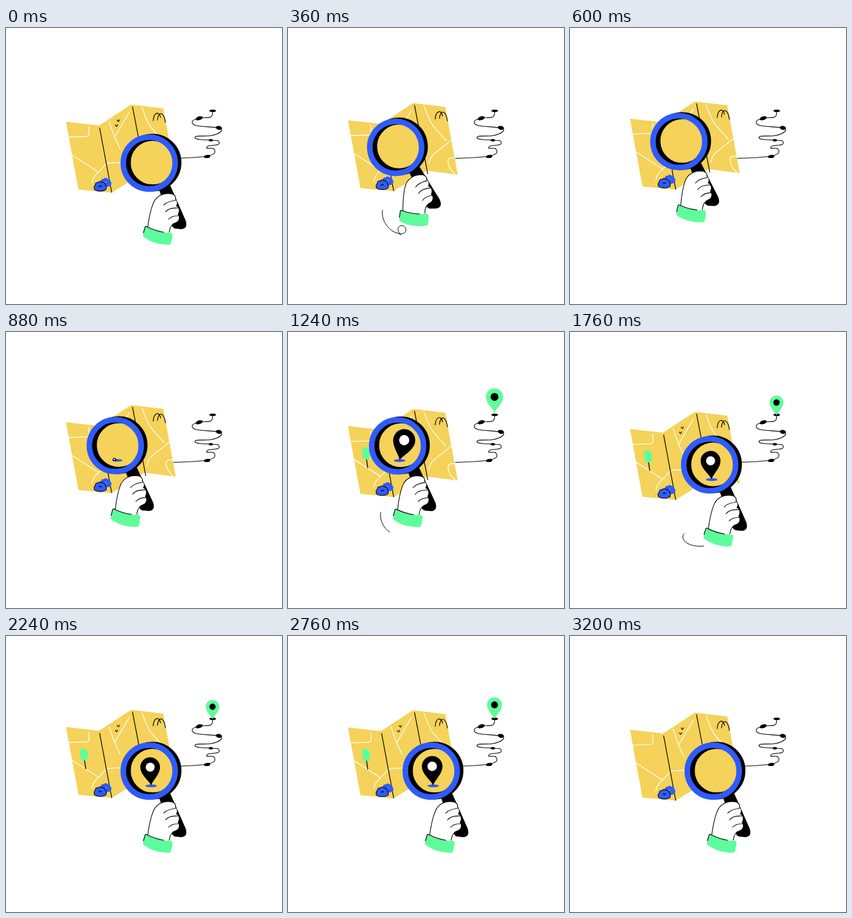
These frames come from a looping animation (450x450 px, 3240 ms). An HTML page with a canvas:

```html
<!DOCTYPE html>
<html lang="en">
<head>
<meta charset="utf-8">
<title>Map search</title>
<style>
html, body { margin: 0; width: 100%; height: 100%; overflow: hidden; background: #fff; }
canvas { display: block; width: 450px; height: 450px; }
</style>
</head>
<body>
<canvas id="stage" width="450" height="450"></canvas>
<script>
const ctx = document.getElementById('stage').getContext('2d');
const LOOP = 3240, STEP = 40, TAU = Math.PI * 2;
const YELLOW = '#f5d259', BLUE = '#2f5bfa', GREEN = '#5ffc9b', BLACK = '#000', WHITE = '#fff';
const LENS = { x: 233.5, y: 220.3 };

// Motion rules
function ease(t, from, to) {
  const u = Math.min(1, Math.max(0, (t - from) / (to - from)));
  return u * u * (3 - 2 * u);
}
const show = (t, in0, in1, out0, out1) => ease(t, in0, in1) - ease(t, out0, out1);
const bump = (t, from, to) => t > from && t < to ? Math.sin(Math.PI * (t - from) / (to - from)) ** 2 : 0;
const wobble = (t, peak, period, decay) => Math.exp((peak - t) / decay) * Math.cos(TAU * (t - peak) / period);

// The first and last quarter swing half as far as the middle
function bob(t) {
  const c = Math.cos(TAU * 2 * t / LOOP);
  return t > LOOP / 4 && t < LOOP * 3 / 4 ? 6 * c : 3 * c - 3;
}

function lensPose(t) {
  const back = 1 - ease(t, 1200, 1900), swing = bump(t, 0, 720);
  return {
    x: -55.3 * ease(t, 0, 360) * back - 2.6 * swing,
    y: -35 * ease(t, 0, 545) * back,
    rot: -1.3 * ease(t, 0, 360) * back - 6.5 * swing
  };
}

// Drawing helpers
function fill(d, color) {
  ctx.fillStyle = color;
  ctx.fill(new Path2D(d));
}

function line(d, color = BLACK, width = 1.1) {
  ctx.strokeStyle = color;
  ctx.lineWidth = width;
  ctx.stroke(new Path2D(d));
}

function oval(x, y, rx, ry, color, rot = 0) {
  ctx.fillStyle = color;
  ctx.beginPath();
  ctx.ellipse(x, y, rx, ry, rot, 0, TAU);
  ctx.fill();
}

function ring(x, y, r, width, color) {
  ctx.strokeStyle = color;
  ctx.lineWidth = width;
  ctx.beginPath();
  ctx.arc(x, y, r, 0, TAU);
  ctx.stroke();
}

// Smooth curve through points
function smooth(pts) {
  const at = i => pts[Math.min(pts.length - 1, Math.max(0, i))];
  let d = 'M' + pts[0];
  for (let i = 0; i < pts.length - 1; i++) {
    const [a, b, c, e] = [at(i - 1), at(i), at(i + 1), at(i + 2)];
    const c1 = b.map((v, k) => v + (c[k] - a[k]) / 6);
    const c2 = c.map((v, k) => v - (e[k] - b[k]) / 6);
    d += `C${c1} ${c2} ${c}`;
  }
  return d;
}

// Teardrop with its tip at x, y and a head of radius r
function pin(x, y, r, rot, body, dot) {
  if (r < 0.1) return;
  ctx.save();
  ctx.translate(x, y);
  ctx.rotate(rot * Math.PI / 180);
  ctx.scale(r, r);
  fill('M0,0C-.16,-.5 -1,-1.1 -1,-1.87A1,1 0 0 1 1,-1.87C1,-1.1 .16,-.5 0,0Z', body);
  oval(0, -1.87, 0.46, 0.46, dot);
  ctx.restore();
}

// Half circle of round lobes over a flat base
function bush(x, y, size, outline) {
  const lobes = (grow, color) => {
    oval(x, y + 2.5, size * 1.4 + grow, size * 0.55 + grow, color);
    for (let i = 0; i < 5; i++) {
      const a = Math.PI * (1 + i / 4);
      const r = size * 0.53 + grow;
      oval(x + Math.cos(a) * size * 0.9, y + Math.sin(a) * size * 0.8, r, r, color);
    }
  };
  if (outline) lobes(0.6, BLACK);
  lobes(outline ? -0.5 : 0, BLUE);
}

function drawTree(s) {
  if (s < 0.01) return;
  ctx.save();
  ctx.translate(130, 221);
  ctx.scale(s, s);
  fill('M-3,-33.5C3,-31 5,-25 3,-18C2,-13 -2,-11 -5,-13C-9,-17 -10,-25 -9,-29C-8,-33 -5,-34.5 -3,-33.5Z', GREEN);
  line('M-1.8,-13L0,0', BLACK, 1.3);
  ctx.restore();
}

function drawMap(t) {
  ctx.save();
  ctx.translate(0, bob(t));
  const sheet = 'M99,154L152,160L204,126L255.5,132L275.5,240.5L226,234L172,267.5L119,262.5Z';
  fill(sheet, YELLOW);
  line(sheet, YELLOW, 2);

  line('M102,178L131,177Q135.5,176 135.5,172L135,161M106,206L151,235' +
    'M190,219L169,220Q164,220 161,224L151,235Q141,243 140,253' +
    'M168,152L177,178L186,197M201,137L177,178' +
    'M222,130Q231,157 240,166L258,186M268,184L238,208Q231,214 230,224' +
    'M274,215Q260,211 261,222Q263,233 272,240', WHITE, 1.3);
  line('M152.7,163L172.3,268M206.3,128.5L227.8,240', BLACK, 1.2);
  for (const [x, y] of [[178, 158], [181, 150]]) line(`M${x},${y}l2.5,2.5l1.5,-3`);
  line('M240,151C241,137 250,135 252,146M247,150C248,136 257,135 260,154', BLACK, 1.2);

  drawTree(show(t, 890, 1220, 2800, 3160));
  bush(162.5, 253, 6.5, false);
  bush(153.7, 259.5, 7, true);
  ctx.restore();
}

const route = 'M273,212.5L302,211.5L328,209.3' + smooth([
  [328, 209.3], [340, 204], [338, 196.5], [327.5, 196], [331, 192], [346, 190], [346, 184],
  [334, 183], [311, 181], [311, 176.5], [334, 175.5], [350, 169], [347, 163],
  [310, 159], [304, 152], [315, 147], [334, 145], [337, 136]
]);

function drawRoute(t) {
  line(route);
  oval(328, 209.4, 5.2, 2.5, BLACK, -0.1);
  oval(334, 183, 3.6, 2, BLACK, 0.1);
  oval(347, 162.8, 5, 3.2, BLACK, 0.2);
  oval(315, 147.2, 5.8, 3, BLACK, -0.3);
  oval(337, 135, 5.5, 2.1, BLACK);
  const bounce = 0.21 * wobble(Math.max(t, 1220), 1220, 760, 1100);
  const size = show(t, 850, 1200, 2840, 3190);
  pin(336.7, 136 - 20 * Math.max(0, bounce) * size, 11.6 * size * (1 + bounce), 0, GREEN, BLACK);
}

function makeTrail(d, head, tail) {
  const el = document.createElementNS('http://www.w3.org/2000/svg', 'path');
  el.setAttribute('d', d);
  return { d, head, tail, len: el.getTotalLength() };
}

const trails = [
  makeTrail('M215,350C205,351 194,347 188,341C180,336 176,326 183,322.5C189,320 195,328 191,333' +
    'C187,338 178,335 170,331C160,323 152,312 154,297', [60, 360], [240, 600]),
  makeTrail('M151,294C149,308 157,321 167,327C178,334 191,335 193,328C193,324 184,327 184,334' +
    'C184,344 200,351 218,349', [1160, 1380], [1400, 2020])
];

function drawTrail(t, { d, head, tail, len }) {
  const a = ease(t, ...tail), b = ease(t, ...head);
  if (b - a < 0.005) return;
  ctx.save();
  ctx.setLineDash([(b - a) * len, len * 2]);
  ctx.lineDashOffset = -a * len;
  line(d, BLACK, 1);
  ctx.restore();
}

function drawHand() {
  fill('M249,262L267,255L293,314Q297,327 286,328L276,327Q271,326 269,319Z', BLACK);
  fill('M231,325C233,310 235,298 240,286C244,275 255,269 266,270C274,270 278,275 276,279' +
    'C279,282 280,287 277,290C283,293 283,300 280,304C284,308 282,315 277,317C271,320 267,325 266,336Z', WHITE);
  line('M231,325C233,310 235,298 240,286C244,275 255,269 266,270C274,270 278,275 276,279');
  line('M257,289C261,284 268,282 277,281M260,300C264,295 272,293 280,293.5' +
    'M265,312C269,307 276,306 282,306M266,333C267,325 270,319 278,317');
  fill('M228,323C240,330 254,334 269,334Q272,335 271.5,339L269,351Q268,354 264,353.5' +
    'C248,353 234,348 225,341Q222,339 224,335Z', GREEN);
  line('M224,334L227,324Q228,322.5 231,324.5C240,329 248,331.5 257,333', BLACK, 1.2);
}

function drawLens(t) {
  const { x, y } = LENS, pose = lensPose(t);
  ctx.save();
  ctx.translate(x + pose.x, y + pose.y);
  ctx.rotate(pose.rot * Math.PI / 180);
  ctx.translate(-x, -y);
  drawHand();
  oval(x + 2, y, 41, 41, YELLOW);
  ring(x + 5.5, y - 0.8, 41.3, 11.4, BLACK);
  ring(x, y, 42.3, 9, BLUE);
  ctx.restore();

  const px = x + pose.x + 3.2, py = y + pose.y + 24;
  const base = show(t, 720, 920, 2940, 3195);
  if (base > 0.01) oval(px, py, 9.4 * base, 2.3 * base, BLUE);
  const size = show(t, 780, 1200, 2840, 3205) * (1 + 0.1 * wobble(Math.max(t, 1220), 1220, 760, 1100));
  const tilt = -3 - 77 * wobble(Math.max(t, 880), 880, 720, 229);
  pin(px, py - 0.5, 16.4 * size, tilt, BLACK, WHITE);
}

function draw(t) {
  ctx.fillStyle = WHITE;
  ctx.fillRect(0, 0, 450, 450);
  ctx.lineCap = ctx.lineJoin = 'round';
  drawMap(t);
  drawRoute(t);
  trails.forEach(tr => drawTrail(t, tr));
  drawLens(t);
}

let start;
function tick(now) {
  if (start === undefined) start = now;
  const t = (now - start) % LOOP;
  draw(Math.floor(t / STEP) * STEP);
  requestAnimationFrame(tick);
}
draw(0);
requestAnimationFrame(tick);
</script>
</body>
</html>
```
